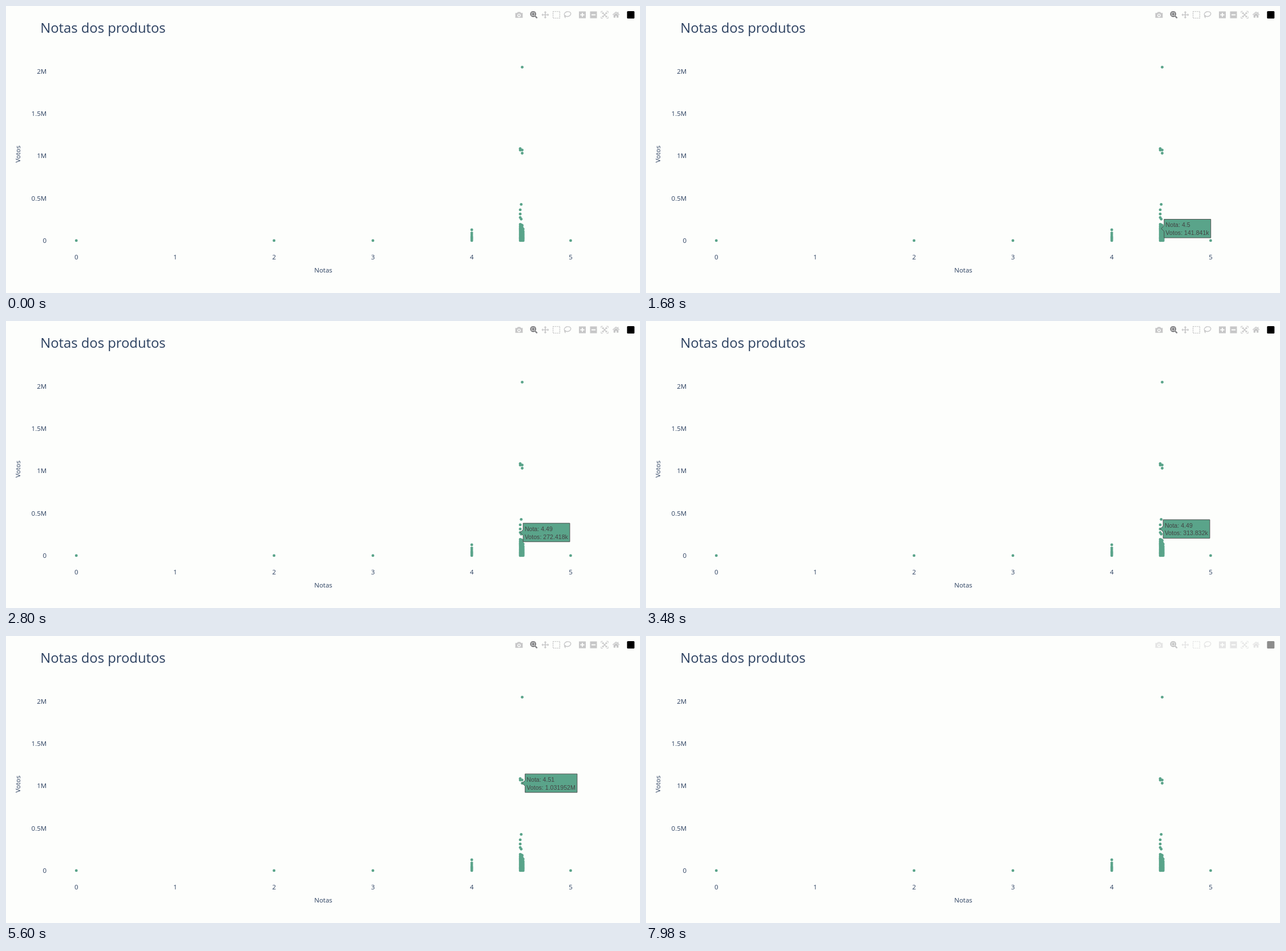
An HTML page for the animation above (8000 ms loop, 1111 by 504 pixels).

```html
<!DOCTYPE html>
<html lang="pt">
<head>
<meta charset="utf-8">
<title>Notas dos produtos</title>
<style>
  html, body { margin: 0; width: 100%; height: 100%; overflow: hidden; background: #fdfefc; }
  svg { display: block; width: 1111px; height: 504px; }
  .chart { font: 11.5px "Open Sans", sans-serif; fill: #2a3f5f; }
  .title { font-size: 23.8px; }
  .mid { text-anchor: middle; }
  .end { text-anchor: end; }
  #dots { fill: #5aa48a; }
  #bar { fill: #c7c7c8; stroke: none; fill-rule: evenodd; }
  #bar .line { fill: none; stroke: #c7c7c8; stroke-width: 1.4; }
  #bar .on { fill: #7d7d80; }
  #tip { font: 10.6px Arial, "Liberation Sans", sans-serif; fill: #444; }
  #tip path { fill: #5aa48a; stroke: #444; stroke-width: .9; }
</style>
</head>
<body>
<svg viewBox="0 0 1111 504">
  <g class="chart" id="chart">
    <text class="title" x="60.2" y="46.5">Notas dos produtos</text>
    <text class="mid" x="556" y="468">Notas</text>
    <text class="mid" transform="translate(24.5 260) rotate(-90)">Votos</text>
  </g>
  <g id="dots"></g>
  <g id="bar">
    <path transform="translate(899 15.5)" d="M-6.5-3.2h3l1.3-1.9h4.4l1.3 1.9h3v8.4h-13zM0-2.1a3 3 0 1 0 .01 0zM0-.7a1.6 1.6 0 1 1-.01 0z"/>
    <path class="on" transform="translate(925 15.5)" d="M-1.2-6.6a5.3 5.3 0 1 1-.01 0zM-4.1-4.1v5.7h5.7v-5.7zM-3.3-3.3h4.1v4.1h-4.1zM1.4 3l1.6-1.6 3.6 3.5-1.7 1.7z"/>
    <path transform="translate(945 15.5)" d="M0-6.5l2.5 2.5h-1.7v3.2h3.2v-1.7l2.5 2.5-2.5 2.5v-1.7h-3.2v3.2h1.7l-2.5 2.5-2.5-2.5h1.7v-3.2h-3.2v1.7l-2.5-2.5 2.5-2.5v1.7h3.2v-3.2h-1.7z"/>
    <rect class="line" x="958.6" y="9.6" width="11.8" height="11.8" stroke-dasharray="2.1 1.2"/>
    <g class="line" transform="translate(984 15.5)">
      <ellipse cx=".3" cy="-1.3" rx="5.8" ry="4.2" transform="rotate(-12)"/>
      <path d="M-4.6 1c-1.6 1.2.2 2.6 1 1.6c.8-1-1-1.8-1.4-.4c-.3 1.4 1.4 1.8 1 3.4"/>
    </g>
    <path transform="translate(1010 15.5)" d="M-6-6h12v12h-12zM-.9-3.6v2.7h-2.7v1.8h2.7v2.7h1.8v-2.7h2.7v-1.8h-2.7v-2.7z"/>
    <path transform="translate(1029.5 15.5)" d="M-6-6h12v12h-12zM-3.6-.9v1.8h7.2v-1.8z"/>
    <g transform="translate(1049 15.5)">
      <path class="line" style="stroke-width:1" d="M-6.2-3.2v-3h3M3.2-6.2h3v3M6.2 3.2v3h-3M-3.2 6.2h-3v-3"/>
      <path class="line" d="M-3.2-3.2l6.4 6.4M3.2-3.2l-6.4 6.4"/>
      <path d="M-4.3-4.3h3.4l-3.4 3.4zM4.3-4.3v3.4l-3.4-3.4zM4.3 4.3h-3.4l3.4-3.4zM-4.3 4.3v-3.4l3.4 3.4z"/>
    </g>
    <g transform="translate(1069 15.5)">
      <path d="M0-3.1l4.3 3.5v4.6h-3.3v-2.9h-2v2.9h-3.3v-4.6z"/>
      <path class="line" d="M-5.8 0l5.8-4.8 5.8 4.8M3.5-5v2.6"/>
    </g>
    <rect x="1088.3" y="9" width="13" height="13" rx="1.5" fill="#000"/>
  </g>
  <g id="tip">
    <path/>
    <text y="-2.6"></text>
    <text y="11.2"></text>
  </g>
</svg>
<script>
const $ = id => document.getElementById(id);
const add = (parent, tag, attrs, text = '') => {
  const el = document.createElementNS('http://www.w3.org/2000/svg', tag);
  for (const k in attrs) el.setAttribute(k, attrs[k]);
  el.textContent = text;
  parent.append(el);
};
const px = nota => 123.2 + nota * 173.25;
const py = votes => 411.9 - votes * 148.7e-6;

for (let i = 0; i < 6; i++)
  add($('chart'), 'text', { class: 'mid', x: px(i), y: 444.7 }, i);
['0', '0.5M', '1M', '1.5M', '2M'].forEach((label, i) =>
  add($('chart'), 'text', { class: 'end', x: 71.2, y: py(i * 5e5) + 4.1 }, label));

const dot = (nota, y) => add($('dots'), 'circle', { cx: px(nota), cy: y, r: 2.45 });
[0, 2, 3, 5].forEach(n => dot(n, 411.9));
[393, 398.6, 402, 405.2, 407.6, 409.8, 411.9].forEach(y => dot(4, y));
// dense columns around 4.5: [nota, top]
[[4.49, 383.4], [4.5, 384.3], [4.51, 385.2], [4.52, 391.7]].forEach(([n, top]) => {
  dot(n, top);
  for (let y = 411.9; y > top + 2; y -= 2.3) dot(n, y);
});

const points = {
  a: [4.51, 1.031952e6], b: [4.51, 1.069258e6], c: [4.49, 1.086471e6],
  d: [4.5, 253105], e: [4.49, 272418], f: [4.49, 313832],
  g: [4.49, 363164], h: [4.5, 426973]
};
Object.values(points).forEach(([n, v]) => dot(n, py(v)));
dot(4.49, 253);
dot(4.51, 107.4);

// [start time, nota, votes]; no point hides the label
const hovers = [
  [0], [700, 4.52, 31188], [840, 4.52, 58506], [980, 4.51, 74976],
  [1100, 4.5, 95116], [1140, 4.5, 103052], [1400, 4.5, 122478], [1680, 4.5, 141841],
  [1820, 4.5, 161677], [1960, 4.51, 178912], [2120, ...points.d], [2260, ...points.e],
  [2960, ...points.d], [3240, ...points.e], [3480, ...points.f], [3640, ...points.g],
  [3920, ...points.h], [4320],
  [5600, ...points.a], [6180, ...points.b], [6320, ...points.c], [7120]
];
const fades = [[0, 1], [7700, .92], [7800, .76], [7900, .58], [7980, .44]];
const at = (list, t) => list.findLast(step => step[0] <= t);

const tip = $('tip');
const [box, top1, top2] = tip.children;
let shown;

function showTip(hover) {
  if (hover === shown) return;
  shown = hover;
  const [, nota, votes] = hover;
  tip.style.display = nota ? '' : 'none';
  if (!nota) return;
  tip.setAttribute('transform', `translate(${px(nota)} ${py(votes)})`);
  top1.textContent = `Nota: ${nota}`;
  top2.textContent = 'Votos: ' + (votes < 1e6 ? (votes / 1e3).toFixed(3) + 'k' : (votes / 1e6).toFixed(6) + 'M');
  top1.setAttribute('x', 7.8);
  top2.setAttribute('x', 7.8);
  const w = Math.max(top1.getComputedTextLength(), top2.getComputedTextLength()) + 5.8;
  box.setAttribute('d', `M0 0L5.1 5V16.3h${w}V-16.3H5.1V-5Z`);
}

function draw() {
  const t = performance.now() % 8000;
  showTip(at(hovers, t));
  $('bar').style.opacity = at(fades, t)[1];
  requestAnimationFrame(draw);
}
draw();
</script>
</body>
</html>
```
